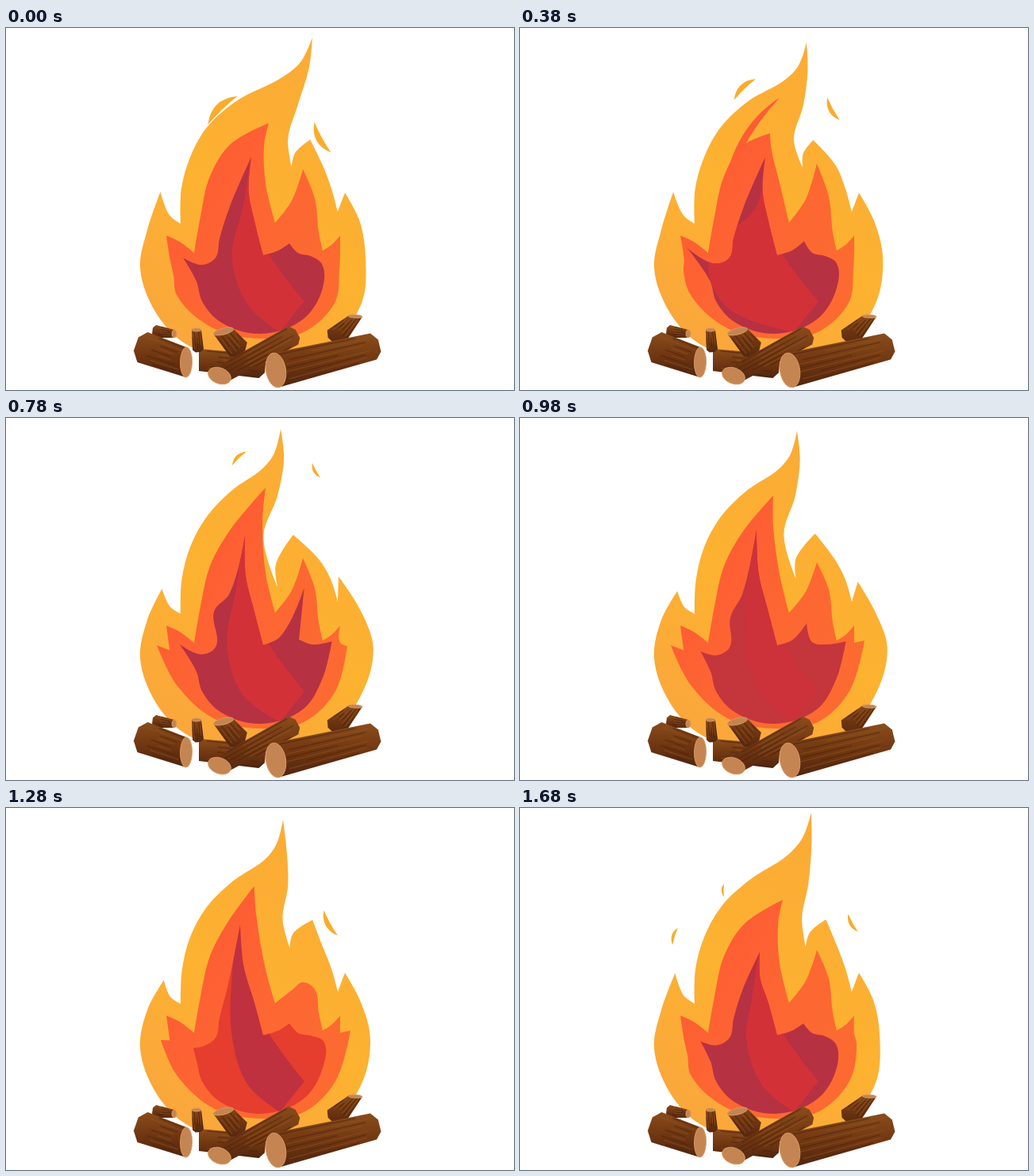
Write an HTML page with a canvas that moves like this. It is 640 by 457 pixels and loops after 1780 ms.

```html
<!DOCTYPE html>
<html lang="en">
<head>
<meta charset="utf-8">
<title>Campfire</title>
<style>
html, body { margin: 0; overflow: hidden; background: #fff; }
canvas { display: block; }
</style>
</head>
<body>
<canvas id="stage" width="640" height="457"></canvas>
<script>
const ctx = document.getElementById('stage').getContext('2d');
const LOOP = 1780, STEPS = 18;

const points = text => text.split(' ').map(p => p.split(',').map(Number));
const mix = (a, b, k) => a.map((v, i) => v + (b[i] - v) * k);
const clamp = v => Math.max(0, Math.min(1, v));
const random = seed => Math.abs(Math.sin(seed * 12.9898) * 43758.5453) % 1;

// Motion rules: a cyclic cosine with phase in steps, and a single soft bump.
const cycle = (step, peak) => Math.cos((step - peak) / STEPS * 2 * Math.PI);
const bump = (step, peak, width) => Math.exp(-(((step - peak) / width) ** 2));

// The three main tips wander through a few places; the rest of the fire follows rules.
const beats = [0, 4, 6, 8, 12, 15, 17];
const tips = {
  outer: points('386,12 361,18 349,6 346,14 352,18 343,8 367,6'),
  middle: points('331,120 315,133 327,88 327,88 311,108 316,80 331,116'),
  core: points('309,163 309,163 309,163 301,149 295,133 295,178 302,182')
};
function tipAt(name, step) {
  const i = beats.findLastIndex(b => b <= step), j = Math.min(i + 1, beats.length - 1);
  return mix(tips[name][i], tips[name][j], (step - beats[i]) / (beats[j] - beats[i] || 1));
}
const lead = (name, anchor, radius) =>
  [anchor, radius, step => tipAt(name, step).map((v, i) => v - anchor[i])];

// Each pull moves the outline near its anchor: [anchor, radius, step => offset].
const layers = {
  outer: {
    outline: points('169,303 178,255 196,212 207,238 220,247 221,205 232,163 253,125 287,92 333,62 349,43 359,12 361,48 357,97 347,140 357,175 359,158 378,141 398,173 410,203 418,232 427,208 446,243 458,290 448,348 408,398 330,414 262,413 222,396 188,358'),
    pulls: [
      lead('outer', [359, 12], 72),
      [[345, 130], 45, s => [8 * cycle(s, 17) - 14 * bump(s, 8.5, 2), 0]],
      [[357, 175], 30, s => [-8 * bump(s, 8.5, 2), 40 * bump(s, 8.5, 2.5)]],
      [[378, 141], 20, s => [-8 * cycle(s, 4.5), 0]],
      [[427, 208], 12, s => [-8 * bump(s, 8, 1.5), -8 * bump(s, 8, 1.5)]],
      [[458, 290], 35, s => [-5 * cycle(s, 0), 0]],
      [[196, 212], 20, s => [-3 * cycle(s, 3), -7 * cycle(s, 2)]]
    ]
  },
  middle: {
    outline: points('215,337 211,312 207,294 202,262 219,270 237,284 245,238 257,187 281,145 323,105 321,138 327,196 339,246 360,218 374,178 389,215 394,258 399,281 411,273 421,262 421,284 420,305 415,345 375,384 320,392 263,380'),
    pulls: [
      lead('middle', [323, 105], 42),
      [[211, 312], 10, s => [-21 * clamp(0.5 - 1.5 * cycle(s, 0)), -25 * clamp(0.5 - 1.5 * cycle(s, 0))]],
      [[420, 305], 10, s => [14 * clamp(0.5 + 1.2 * cycle(s, 12)), -24 * clamp(0.5 + 1.2 * cycle(s, 12))]],
      [[374, 178], 38, s => [0, 42 * bump(s, 13, 2) - 9 * bump(s, 5, 2)]]
    ]
  },
  core: {
    outline: points('240,320 223,290 247,299 264,290 269,266 281,225 303,160 303,205 313,245 324,287 343,281 357,272 368,284 384,288 398,298 399,328 375,367 321,386 270,371 247,345'),
    pulls: [
      lead('core', [303, 160], 50),
      [[223, 290], 18, s => [-13 * cycle(s, 4.5), -13 * cycle(s, 4.5)]],
      [[357, 272], 10, s => [20 * bump(s, 7.5, 2), -62 * bump(s, 7.5, 2)]],
      [[398, 298], 12, s => [14 * bump(s, 9, 3), -18 * bump(s, 9, 3)]],
      [[269, 266], 12, s => [-7 * bump(s, 8.5, 2), -24 * bump(s, 8.5, 2)]]
    ]
  }
};

// x, y, length, tilt, first step, last step, drift x, drift y per step.
const sparks = [
  [273, 104, 52, 0.8, 0, 9, 2.6, -6.6],
  [399, 138, 44, -0.5, 0, 9, -1, -9],
  [404, 145, 42, -0.5, 11, 17, 2.6, 0],
  [191, 198, 28, 0.3, 14, 17, 1.5, -12],
  [315, 39, 20, 0, 14, 15, 0, 0],
  [257, 104, 18, 0, 16, 17, 0, 0]
];

// Closed curve through the points; sharp turns stay corners.
function blob(pts) {
  const n = pts.length;
  const unit = (a, b) => {
    const x = b[0] - a[0], y = b[1] - a[1], d = Math.hypot(x, y) || 1;
    return [x / d, y / d];
  };
  const tangents = pts.map((p, i) => {
    const u = unit(pts[(i + n - 1) % n], p), v = unit(p, pts[(i + 1) % n]);
    return u[0] * v[0] + u[1] * v[1] < 0.35 ? [0, 0] : unit([0, 0], [u[0] + v[0], u[1] + v[1]]);
  });
  const path = new Path2D();
  path.moveTo(...pts[0]);
  pts.forEach((p, i) => {
    const j = (i + 1) % n, q = pts[j], s = tangents[i], t = tangents[j];
    const d = Math.hypot(q[0] - p[0], q[1] - p[1]) / 3;
    path.bezierCurveTo(p[0] + s[0] * d, p[1] + s[1] * d, q[0] - t[0] * d, q[1] - t[1] * d, ...q);
  });
  path.closePath();
  return path;
}

function layerPath({ outline, pulls }, step) {
  const active = pulls.map(([anchor, radius, offset]) => [anchor, radius, offset(step)]);
  return blob(outline.map(([x, y]) => active.reduce(([px, py], [[ax, ay], radius, [dx, dy]]) => {
    const weight = bump(Math.hypot(x - ax, y - ay), 0, radius);
    return [px + dx * weight, py + dy * weight];
  }, [x, y])));
}

function gradient(x0, y0, x1, y1, ...colors) {
  const g = ctx.createLinearGradient(x0, y0, x1, y1);
  colors.forEach((c, i) => g.addColorStop(i / (colors.length - 1), c));
  return g;
}
function fill(path, color) {
  ctx.fillStyle = color;
  ctx.fill(path);
}
function inside(path, draw) {
  ctx.save();
  ctx.clip(path);
  draw();
  ctx.restore();
}

function drawSpark([x, y, length, tilt, first, last, driftX, driftY], step) {
  if (step < first || step > last) return;
  const age = step - first, half = length / 2 * (1 - 0.065 * age);
  ctx.save();
  ctx.translate(x + driftX * age, y + driftY * age);
  ctx.rotate(tilt);
  fill(new Path2D(`M0 ${-half}Q${-half * 0.8} 0 0 ${half}Q${-half * 0.1} 0 0 ${-half}Z`), '#f9ac2b');
  ctx.restore();
}

function drawFlame(step) {
  const path = name => layerPath(layers[name], step);
  const outer = path('outer'), middle = path('middle'), core = path('core');
  const orange = gradient(240, 180, 410, 300, '#fe5c33', '#fd6632', '#fc6a31');

  fill(outer, gradient(190, 380, 390, 80, '#faa63c', '#fdb230', '#fbac35'));
  sparks.forEach(spark => drawSpark(spark, step));
  if (step > 2 && step < 6) fill(new Path2D('M254 225Q262 130 327 88Q270 150 254 225Z'), '#fe5c33');
  fill(middle, orange);

  // The dark heart glows red for a moment while its band turns dark.
  const glow = bump(step, 12, 1.6), dark = [182, 49, 66], crimson = [211, 49, 56];
  const tint = (from, to) => `rgb(${mix(from, to, glow)})`;
  fill(core, tint(dark, [251, 66, 36]));
  inside(core, () => {
    const left = 285 - 60 * bump(step, 5, 2), [x, y] = tipAt('core', step);
    fill(blob([[left, 290], [x - 10, y + 60], [x, y - 8], [318, 260], [376, 345], [345, 384], [left + 20, 350]]),
      tint(crimson, dark));
  });
}

// Tapered log from a rounded back end to a sawn face, with seeded grain.
function drawLog([x0, y0, r0, x1, y1, r1, flat, tilt], index) {
  const length = Math.hypot(x1 - x0, y1 - y0), ux = (x1 - x0) / length, uy = (y1 - y0) / length;
  const across = (k, end) => end
    ? [x1 - Math.sin(tilt) * r1 * k, y1 + Math.cos(tilt) * r1 * k]
    : [x0 - uy * r0 * k, y0 + ux * r0 * k];
  const back = k => [x0 - uy * r0 * k - ux * r0 * 0.45, y0 + ux * r0 * k - uy * r0 * 0.45];
  const body = new Path2D(`M${across(-1, 1)}L${across(-1)}L${back(-0.5)}L${back(0.4)}L${across(1)}L${across(1, 1)}Z`);
  const top = Math.min(y0 - r0, y1 - r1), bottom = Math.max(y0 + r0, y1 + r1);
  fill(body, gradient(0, top, 0, bottom, '#8a4d1c', '#713711', '#4f240f'));
  inside(body, () => {
    ctx.lineWidth = 1.3;
    for (let i = 0; i < 9; i++) {
      const k = -0.9 + i * 0.22, seed = index * 20 + i;
      const a = mix(across(k), across(k, 1), random(seed) * 0.4);
      const b = mix(across(k), across(k, 1), 0.6 + random(seed + 0.5) * 0.4);
      ctx.strokeStyle = i % 2 ? '#94561f80' : '#4a200e90';
      ctx.stroke(new Path2D(`M${a}L${b}`));
    }
  });
  if (!flat) return;
  const face = new Path2D();
  face.ellipse(x1, y1, flat, r1, tilt, 0, 7);
  fill(face, '#c58552');
  ctx.strokeStyle = '#d8995f';
  ctx.lineWidth = 1;
  ctx.stroke(face);
}

// Back end x, y, radius; face x, y, radius; face depth and tilt.
const logs = [
  [320, 427, 15, 243, 419, 14, 0, 3.14],
  [188, 383, 8, 212, 386, 5, 3, 0],
  [242, 406, 7, 240, 381, 6, 2, -1.57],
  [293, 406, 14, 274, 383, 13, 4, -1.82],
  [415, 391, 14, 440, 364, 9, 2, -1.52],
  [172, 403, 20, 227, 422, 19, 7.5, 0.02],
  [362, 388, 13, 269, 439, 15, 10, 1.95],
  [463, 402, 17, 340, 432, 22, 12.5, 2.98]
];

function render(now) {
  const t = now % LOOP;
  const step = t < 100 ? 0 : Math.floor((t + 20) / 100);
  ctx.fillStyle = '#fff';
  ctx.fillRect(0, 0, 640, 457);
  drawFlame(step);
  logs.forEach(drawLog);
  requestAnimationFrame(render);
}
render(0);
</script>
</body>
</html>
```
